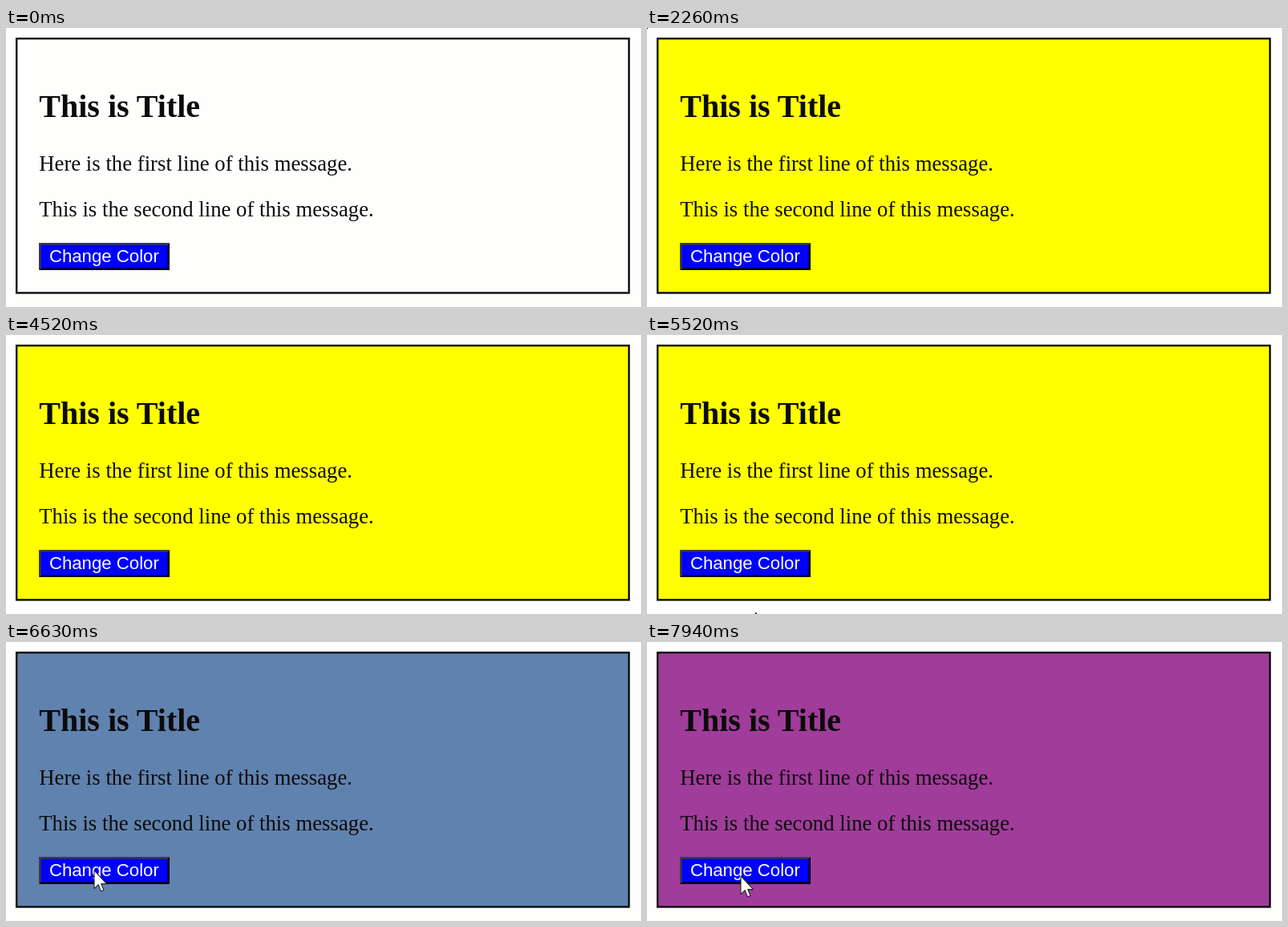
Write an HTML page that moves like this. It is 792 by 348 pixels and loops after 8 s.

```html
<!DOCTYPE html>
<html lang="en">
<head>
<meta charset="utf-8">
<title>Change Color</title>
<style>
  html, body { margin: 0; width: 100%; height: 100%; overflow: hidden; background: #fefefd; }
  svg { display: block; width: 792px; height: 348px; }
  text { white-space: pre; font-variant-ligatures: none; fill: #0b0b0b; }
  .serif { font: 26.75px "Liberation Serif", "Times New Roman", serif; }
  .title { font: bold 40px "Liberation Serif", "Times New Roman", serif; }
  .label { font: 22.2px "Liberation Sans", Arial, sans-serif; fill: #fff; }
</style>
</head>
<body>
<svg viewBox="0 0 792 348" xmlns="http://www.w3.org/2000/svg">
  <rect width="792" height="348" fill="#fefefd"/>
  <text id="loading" class="serif" x="11.7" y="36.3">Loading...</text>
  <g id="card">
    <rect id="panel" x="13.2" y="13.2" width="763.8" height="317.2" stroke="#0a0a0a" stroke-width="2.4"/>
    <text class="title" x="41.3" y="111">This is Title</text>
    <text class="serif" x="41.2" y="178">Here is the first line of this message.</text>
    <text class="serif" x="41.2" y="235.3">This is the second line of this message.</text>
    <path id="upper" d="M41 268H204L201 271H44V299L41 302Z"/>
    <path id="lower" d="M204 268V302H41L44 299H201V271Z"/>
    <rect x="43.5" y="270.5" width="158" height="29" fill="#00f"/>
    <text class="label" x="53.9" y="292.4">Change Color</text>
  </g>
  <rect id="dot" width="1" height="1" fill="#000"/>
  <path id="cursor" d="M0 0V16.6L3.8 13L6.3 19L8.8 18L6.4 12.2H11.4Z" fill="#fff" stroke="#222" stroke-width=".8" stroke-linejoin="round"/>
</svg>
<script>
const LOOP = 8000;
const el = id => document.getElementById(id);
const [loading, card, panel, upper, lower, dot, cursor] =
  ["loading", "card", "panel", "upper", "lower", "dot", "cursor"].map(el);

// Panel colour from each time on
const fills = [[0, "#fefefd"], [2260, "#ffff00"], [6360, "#6082ae"], [7890, "#a03c9a"]];
const presses = [[6290, 6360], [7720, 7890]];
// Pointer tip: time, x, y
const track = [[5470, 136, 348], [6000, 112, 288], [6260, 110, 285], [7150, 110, 285],
  [7500, 117, 278], [7890, 117, 278], [7940, 117, 292]];

const within = (t, a, b) => t >= a && t < b;
const show = (node, on) => node.setAttribute("visibility", on ? "visible" : "hidden");

function pointer(t) {
  const i = track.findIndex(k => k[0] > t);
  if (i < 0) return track[track.length - 1].slice(1);
  const [t0, x0, y0] = track[i - 1], [t1, x1, y1] = track[i];
  const p = (t - t0) / (t1 - t0), e = p * p * (3 - 2 * p);
  return [x0 + (x1 - x0) * e, y0 + (y1 - y0) * e];
}

function draw(t) {
  const waiting = within(t, 890, 2260);
  show(loading, waiting);
  show(card, !waiting);
  show(dot, within(t, 1570, 3100));
  panel.setAttribute("fill", fills.filter(f => f[0] <= t).pop()[1]);

  const down = presses.some(([a, b]) => within(t, a, b));
  upper.setAttribute("fill", down ? "#000" : "#3c3c3c");
  lower.setAttribute("fill", down ? "#4c4c4c" : "#000");

  const moving = t >= track[0][0];
  show(cursor, moving);
  if (moving) {
    const [x, y] = pointer(t);
    cursor.setAttribute("transform", `translate(${x} ${y}) scale(1.36)`);
  }
}

const start = performance.now();
function tick() {
  draw((performance.now() - start) % LOOP);
  requestAnimationFrame(tick);
}
tick();
</script>
</body>
</html>
```
